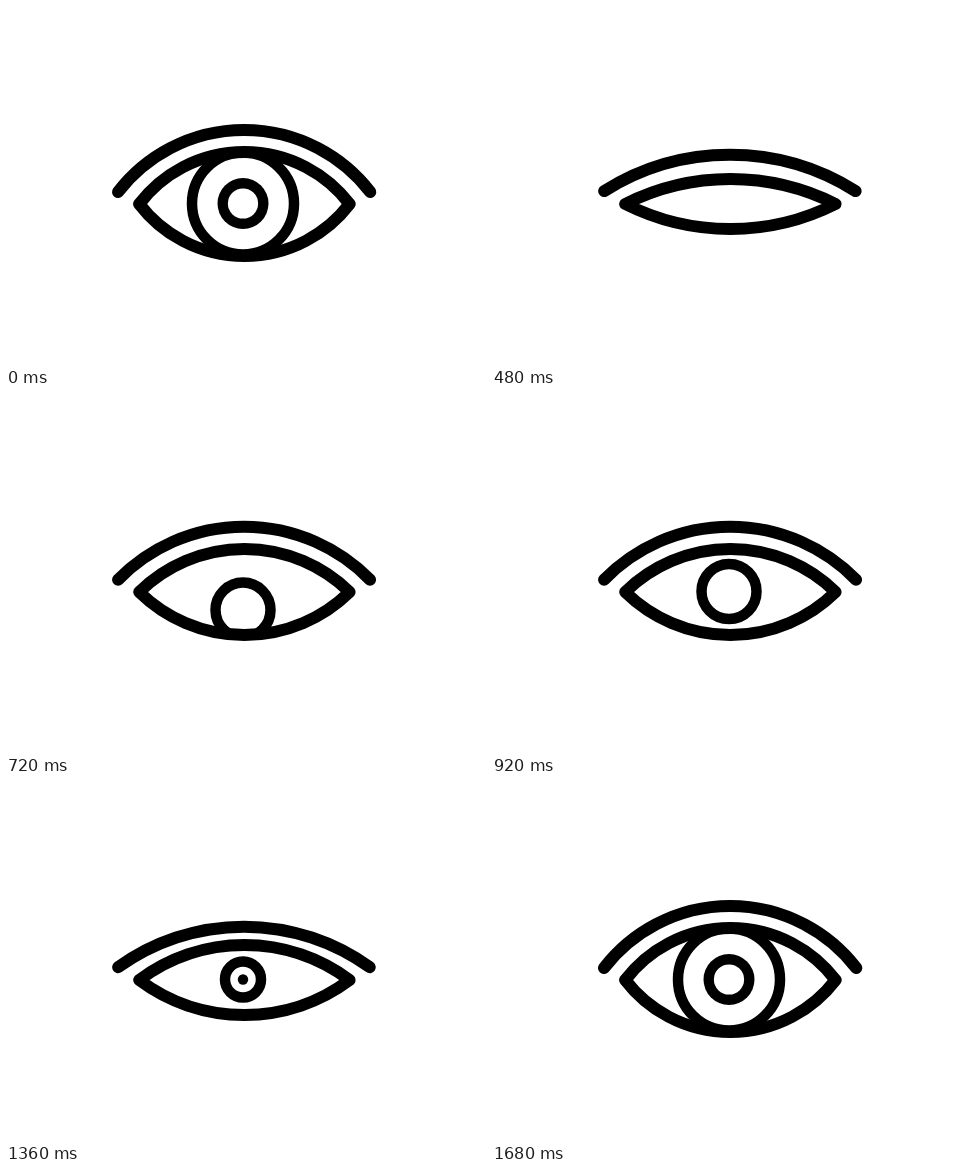
Recreate the animation shown at these times as an HTML page. Size 480 by 360 pixels, loop 5.36 s.

```html
<!DOCTYPE html>
<html lang="en">
<head>
<meta charset="utf-8">
<title>Blinking eye</title>
<style>
  html, body { margin: 0; width: 100%; height: 100%; overflow: hidden; background: #fff; }
  svg { display: block; width: 100%; height: 100%; }
  path, #iris { fill: none; stroke: #000; stroke-width: 12; stroke-linecap: round; stroke-linejoin: round; }
  #iris { stroke-width: 10.5; }
  #core { fill: #fff; }
</style>
</head>
<body>
<svg viewBox="0 0 480 360">
  <clipPath id="opening"><path id="hole"/></clipPath>
  <g clip-path="url(#opening)">
    <g id="eyeball">
      <circle id="iris"/>
      <circle id="pupil"/>
      <circle id="core"/>
    </g>
  </g>
  <path id="lids"/>
  <path id="brow"/>
</svg>
<script>
const LOOP = 5360, STEP = 40;
const MID = 198, LEFT = 133.2, RIGHT = 343.6;
const $ = id => document.getElementById(id);
const set = (id, name, value) => $(id).setAttribute(name, value);

// Smooth progress from 0 to 1 between two times.
function ease(t, from, to) {
  const u = Math.min(1, Math.max(0, (t - from) / (to - from)));
  return u * u * (3 - 2 * u);
}

function arcTo(x0, x1, y, sag) {
  const half = Math.abs(x1 - x0) / 2, s = Math.max(sag, 0.2);
  const r = (half * half + s * s) / (2 * s);
  return `A${r} ${r} 0 0 1 ${x1} ${y}`;
}

function draw(t) {
  const shut = ease(t, 0, 270);
  const settle = ease(t, 620, 720);
  const squint = ease(t, 1160, 1360);
  const widen = ease(t, 1360, 1680);

  const lid = 52 * (1 - shut) + 50 * ease(t, 310, 650) - 7 * settle - 8 * squint + 17 * widen;
  const shape = `M${LEFT} ${MID}${arcTo(LEFT, RIGHT, MID, lid)}${arcTo(RIGHT, LEFT, MID, lid)}Z`;
  set('lids', 'd', shape);
  set('hole', 'd', shape);

  const rise = 62 * (1 - shut) + 56 * ease(t, 270, 620) - 3 * settle - 12.4 * squint + 21.4 * widen;
  const lift = Math.sqrt(Math.max(0, rise) / 62);
  const x0 = 112.8 - 0.8 * lift, x1 = 361.3 + 3 * lift, y = 182 + 4 * lift;
  set('brow', 'd', `M${x0} ${y}${arcTo(x0, x1, y, rise)}`);

  // The eyeball drops behind the shut lids, then rolls up into view.
  const drop = 66 * (ease(t, 250, 320) - ease(t, 460, 860));
  set('eyeball', 'transform', `translate(237 ${197.5 + drop})`);
  set('iris', 'r', 51 - 23.5 * shut - 9.5 * squint + 33 * widen);

  const ring = 20.3 * (1 - shut + widen);
  const dot = 5.2 * (1 - ease(t, 200, 270) + ease(t, 1320, 1360));
  set('pupil', 'r', ring + dot);
  set('core', 'r', Math.max(0, ring - dot));
}

const start = performance.now();
function tick() {
  const t = (performance.now() - start) % LOOP;
  draw(Math.floor(t / STEP) * STEP);
  requestAnimationFrame(tick);
}
tick();
</script>
</body>
</html>
```
